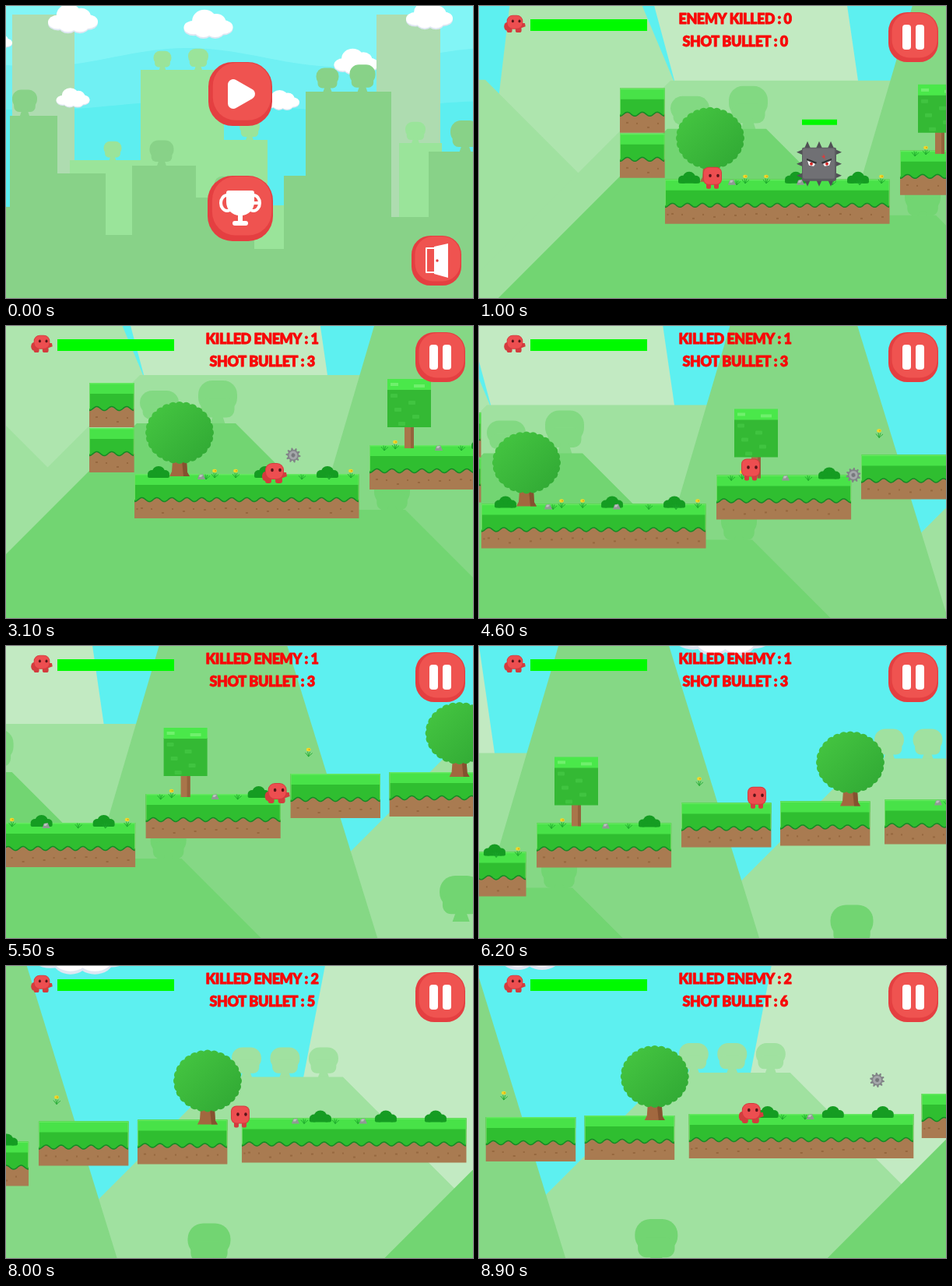
These frames come from a looping animation (600x375 px, 9000 ms). An HTML page with a canvas:

```html
<!DOCTYPE html>
<html>
<head>
<meta charset="utf-8">
<style>
html, body { margin: 0; width: 100%; height: 100%; overflow: hidden }
canvas { display: block; width: 600px; height: 375px }
</style>
</head>
<body>
<canvas id="stage" width="600" height="375"></canvas>
<script>
const c = document.getElementById('stage').getContext('2d');
const LOOP = 9000, MENU_END = 600, BLOCK = 57.7;

// Walk: [time, x]; jumps: [start, duration, height, rise to the next ledge]
const walk = [[1300,61],[2000,83],[2400,90],[3100,180],[3900,248],[4600,346],[5500,471],[6200,585],
  [7400,747],[8350,747],[8900,829]];
const jumps = [[250,700,50,0],[3900,750,30,37],[5500,730,36,26],[6650,850,50,4]];
// [time, target x, target y, flight, arc, rest]
const shots = [[2000,172,-20,350,10,0],[2400,172,-20,300,10,0],[3100,478,-37,1100,45,700],
  [7200,880,-95,650,52,0],[7300,880,-95,650,30,0],[8200,1085,-95,1000,20,0]];
const enemies = [[198,-20,2700],[902,-90,7950],[1114,-113,LOOP]];
const ledges = [[-58,-117,1],[-58,-59,1],[0,0,5],[302,-37,3],[488,-63,2],[615,-65,2],[749,-67,5],[1048,-93,5]];

const clamp = u => Math.min(1, Math.max(0, u));
const mix = (a, b, u) => a + (b - a) * u;
const hop = u => 4 * u * (1 - u);

function heroAt(t) {
  let x = walk[0][1], y = 12;
  walk.slice(1).forEach(([end, to], i) => {
    const [begin, from] = walk[i];
    x += (to - from) * clamp((t - begin) / (end - begin));
  });
  for (const [begin, span, height, rise] of jumps) {
    const u = clamp((t - begin) / span);
    y -= rise * u + height * hop(u);
  }
  return [x, y];
}
// The camera trails the hero: mean position over the last 0.7 s.
function cameraAt(t) {
  let x = 0, y = 0;
  const n = 28;
  for (let i = 0; i < n; i++) {
    const [hx, hy] = heroAt(t - (i + .5) * 700 / n);
    x += hx / n;
    y += hy / n;
  }
  return [300 - x, 202 - y];
}

function rect(color, x, y, w, h, r = 0) {
  c.fillStyle = color;
  c.beginPath();
  c.roundRect(x, y, w, h, r);
  c.fill();
}
function oval(color, x, y, rx, ry = rx) {
  c.fillStyle = color;
  c.beginPath();
  c.ellipse(x, y, rx, ry, 0, 0, 7);
  c.fill();
}
function poly(color, ...p) {
  c.fillStyle = color;
  c.beginPath();
  for (let i = 0; i < p.length; i += 2) c.lineTo(p[i], p[i + 1]);
  c.closePath();
  c.fill();
}
function at(x, y, draw, s = 1) {
  c.save();
  c.translate(x, y);
  c.scale(s, s);
  draw();
  c.restore();
}

// Flat tree standing on (x, y)
function shadowTree(color, x, y, w, h) {
  rect(color, x - w / 2, y - h, w, h * .72, w * .36);
  rect(color, x - w * .43, y - h * .6, w * .86, h * .45, w * .2);
  poly(color, x - w * .1, y - h * .25, x + w * .1, y - h * .25, x + w * .2, y + 1, x - w * .2, y + 1);
}
function cloud(x, y, w) {
  at(x, y, () => {
    for (const [color, dy] of [['#dfe6f2', 3], ['#fff', 0]]) {
      oval(color, -30, 4 + dy, 20, 14);
      oval(color, 30, 3 + dy, 20, 14);
      oval(color, -8, -10 + dy, 25, 22);
      oval(color, 16, -6 + dy, 20, 18);
      oval(color, -10, 10 + dy, 18, 14);
      oval(color, 14, 11 + dy, 18, 13);
    }
  }, w / 100);
}
function button(x, y, s) {
  rect('#e43f41', x, y, s, s, s * .38);
  rect('#ef5350', x + s * .07, y + 1, s * .91, s * .9, s * .36);
}

// Steps are [left, top]; trees are [x, width].
function skyline(color, steps, trees) {
  steps.forEach(([x, y], i) => rect(color, x, y, (steps[i + 1] || [600])[0] - x, 375 - y));
  for (const [x, w] of trees) shadowTree(color, x, steps.findLast(s => s[0] <= x)[1], w, w * 1.05);
}

function menu() {
  const far = '#aedcb0';
  rect('#82f5f6', 0, 0, 600, 375);
  for (const [color, y, amp] of [['#70f0f3', 66, 12], ['#5deef0', 128, 6]]) {
    c.fillStyle = color;
    c.beginPath();
    c.moveTo(0, 375);
    for (let x = 0; x <= 600; x += 10) c.lineTo(x, y - amp * Math.sin(x / 62 - 2.2));
    c.lineTo(600, 375);
    c.fill();
  }
  cloud(-10, 46, 36);
  cloud(450, 73, 57);
  rect(far, 8, 11, 80, 300);
  rect(far, 476, 11, 82, 300);
  for (const [x, y, w] of [[86,18,64],[260,25,63],[544,14,60],[86,119,43],[355,122,44]]) cloud(x, y, w);
  skyline('#9ae49a', [[82,198],[173,82],[280,172],[336,256],[380,375],[505,176],[560,375]],
    [[137,23],[201,23],[247,26],[313,26],[526,26]]);
  skyline('#88d288', [[0,258],[5,141],[66,215],[128,294],[162,205],[244,246],[319,312],[357,218],[385,110],
    [495,271],[543,187]], [[24,32],[200,31],[281,26],[413,29],[458,33],[590,38]]);

  button(260, 72, 82);
  c.lineJoin = 'round';
  c.lineWidth = 14;
  c.strokeStyle = '#fff';
  poly('#fff', 292, 101, 292, 125, 313, 113);
  c.stroke();

  button(259, 218, 84);
  c.lineWidth = 4;
  c.beginPath();
  c.ellipse(284, 253, 8, 10, 0, 0, 7);
  c.ellipse(318, 253, 8, 10, 0, 0, 7);
  c.stroke();
  rect('#fff', 283, 237, 36, 32, [3, 3, 17, 17]);
  rect('#fff', 298, 266, 6, 13);
  rect('#fff', 291, 276, 20, 6, 3);

  button(521, 295, 64);
  c.lineWidth = 2;
  c.strokeRect(540, 311, 24, 31);
  poly('#fff', 550, 309, 568, 305, 568, 349, 550, 344);
  oval('#e43f41', 554, 327, 1.7);
}

// Flat-topped hill; a and b are how far each side spreads per pixel down.
function hill(color, x1, x2, top, a, b) {
  const h = 260 - top;
  poly(color, x1, top, x2, top, x2 + b * h, 260, x1 - a * h, 260);
}
function backdrop() {
  const pale = '#c2eac2', light = '#a0e1a0', medium = '#85d885', deep = '#72d572', shade = '#82d982';
  hill(pale, -40, 220, -320, -.27, .145);
  hill('#aee5ae', -188, -70, -320, .12, .42);
  hill(light, -400, -231, -128, 0, 1);
  hill(light, 7, 320, -127, 1, 0);
  cloud(542, -287, 130);
  hill(pale, 869, 1300, -330, .194, 0);
  for (let i = 0; i < 3; i++) shadowTree(light, 755 + 49.5 * i, -119, 38, 39);
  hill(light, 722, 879, -120, 1, 1);
  shadowTree(deep, 707, 126, 55, 58);
  hill(medium, 334, 468, -278, .295, .309);
  shadowTree(shade, 32, -64, 50, 43);
  shadowTree(shade, 107, -64, 50, 56);
  shadowTree(deep, 331, 54, 46, 50);
  hill(deep, 3, 130, -65, 1, 1);
  hill(deep, 100, 348, 46, 0, 1);
  hill(deep, -400, 300, 153, 0, 0);
  hill(deep, 1145, 1400, -100, 1, 0);
}

function platform(x, y, blocks) {
  const w = blocks * BLOCK;
  const wave = () => {
    for (let i = 0; i <= w; i++) c.lineTo(i, 33 + 2.5 * Math.cos(i * 6 * Math.PI / BLOCK));
  };
  at(x, y, () => {
    rect('#a97b51', 0, 0, w, 57);
    c.fillStyle = '#96683f';
    for (let i = 8; i < w - 4; i += 27) {
      c.fillRect(i, 43 + i % 4 * 2, 3, 2);
      c.fillRect((i + 13) % w, 50 - i % 3 * 3, 2, 2);
    }
    c.fillStyle = '#2fbe30';
    c.beginPath();
    c.lineTo(0, 0);
    wave();
    c.lineTo(w, 0);
    c.fill();
    c.lineWidth = 1.5;
    c.strokeStyle = '#148a25';
    c.beginPath();
    wave();
    c.stroke();
    rect('#48e248', 0, 0, w, 14);
    rect('#64ea60', 0, 0, w, 1.5);
    rect('#6ddd64', 0, 0, 1, 33);
    rect('#6ddd64', w - 1, 0, 1, 33);
  });
}

function roundTree(x, y) {
  at(x, y, () => {
    poly('#a2683f', -9, -20, 9, -20, 10, -5, 13, 0, -13, 0, -10, -6);
    poly('#85512f', 3, -20, 9, -20, 10, -5, 13, 0, 5, 0);
    const leaf = c.createLinearGradient(-30, -85, 30, -25);
    leaf.addColorStop(0, '#43c340');
    leaf.addColorStop(1, '#32ab35');
    for (let i = 0; i < 28; i++) {
      const a = i * Math.PI / 14;
      oval(leaf, 38 * Math.cos(a), -56 + 34 * Math.sin(a), 6);
    }
    oval(leaf, 0, -56, 42, 38);
  });
}
function squareTree(x, y) {
  at(x, y, () => {
    rect('#a9754a', -6, -28, 12, 28);
    rect('#94633c', 2, -28, 4, 28);
    rect('#34b934', -28, -76, 56, 49);
    rect('#4ae84a', -28, -89, 56, 14);
    for (let i = 0; i < 5; i++) rect('#40c440', -24 + i * 23 % 41, -70 + i * 9, 9, 5, 1);
    rect('#6ff06c', -24, -84, 10, 4);
    rect('#6ff06c', 6, -82, 14, 4);
  });
}
function bush(x, y) {
  const green = '#159c22';
  oval(green, x, y - 8, 8, 7);
  oval(green, x - 8, y - 5, 6, 5);
  oval(green, x + 8, y - 5, 6, 5);
  rect(green, x - 14, y - 5, 28, 5, 2);
}
function grass(x, y) {
  c.strokeStyle = '#1ba52b';
  c.lineWidth = .8;
  c.beginPath();
  for (const d of [-4, -1, 2, 5]) {
    c.moveTo(x, y + 4);
    c.lineTo(x + d, y - 3 + Math.abs(d) / 2);
  }
  c.stroke();
}
function flower(x, y) {
  grass(x, y + 4);
  oval('#f0d92b', x, y - 1, 2.8, 2.2);
  oval('#dba812', x + 1, y - 1, 1);
}
function rock(x, y) {
  poly('#8f9a94', x - 5, y + 3, x - 3, y - 3, x + 2, y - 4, x + 5, y + 3);
  poly('#b9c2bd', x - 3, y, x - 2, y - 3, x + 2, y - 3, x, y);
}
function plant(draw, dy, ...xs) {
  for (const x of xs) draw(x, ledges.findLast(l => l[0] <= x)[1] + dy);
}

function enemy(x, y) {
  rect('#00f800', x - 22, y - 57, 45, 7);
  at(x, y, () => {
    for (let side = 0; side < 4; side++) {
      for (const p of [-15, 0, 15]) poly('#505155', p - 4, -20, p, -29, p + 4, -20);
      c.rotate(Math.PI / 2);
    }
    rect('#5c5d61', -22, -21, 44, 43, 2);
    rect('#707074', -21, -20, 41, 39, 2);
    for (const s of [-1, 1]) {
      poly('#fff', s * 5, 0, s * 15, -4, s * 13, 2, s * 7, 3);
      oval('#d42525', s * 10, 0, 2);
      poly('#333', s * 3, -2, s * 16, -7, s * 16, -5, s * 4, 0);
    }
    poly('#e33', 5, -13, 8, -9, 6, -9, 9, -5, 3, -10, 6, -10);
  });
}
function gear(x, y, angle) {
  at(x, y, () => {
    c.rotate(angle);
    const teeth = [];
    for (let i = 0; i < 40; i++) {
      const r = i % 4 < 2 ? 9.5 : 7, a = i * Math.PI / 20;
      teeth.push(r * Math.cos(a), r * Math.sin(a));
    }
    poly('#818487', ...teeth);
    oval('#a4a7aa', 0, 0, 5.5);
    oval('#777a7d', 0, 0, 2.5);
  });
}
function bullet(t, [fired, tx, ty, flight, arc, rest]) {
  if (t < fired || t > fired + flight + rest) return;
  const u = clamp((t - fired) / flight), [x, y] = heroAt(fired);
  const bx = mix(x + 24, tx, u);
  gear(bx, mix(y - 36, ty, u) - arc * hop(u), bx / 9);
}

// Feet stand on (x, y)
function blob(x, y, run, s = 1) {
  const edge = '#d33c3e', red = '#ed4e50';
  at(x, y, () => {
    if (run) {
      rect(edge, -12, -8, 8, 8, 3);
      rect(edge, 1, -8, 9, 8, 3);
      oval(edge, -12, -9, 4, 6);
      poly(edge, 6, -14, 15, -14, 16, -9, 8, -6);
      rect(edge, -12, -26, 24, 21, 9);
      rect(red, -11, -25, 22, 19, 8);
    } else {
      rect(edge, -8, -8, 6, 8, 2);
      rect(edge, 2, -8, 6, 8, 2);
      rect(edge, -12, -28, 24, 23, 7);
      rect(red, -11, -27, 22, 21, 6);
    }
    oval('#5a1418', -3, -17, 1.8, 2.2);
    oval('#5a1418', 7, -17, 1.8, 2.2);
  }, s);
}

function game(t) {
  const [hx, hy] = heroAt(t);
  rect('#5df0f0', 0, 0, 600, 375);
  at(...cameraAt(t), () => {
    backdrop();
    for (const l of ledges) platform(...l);
    plant(bush, 5, 31, 168, 248, 447, 850, 934, 998);
    roundTree(58, 3);
    roundTree(705, -59);
    squareTree(353, -33);
    plant(grass, 3, 92, 215, 250, 321, 420, 829, 869, 898);
    plant(flower, -3, 103, 130, 278, 335, 1086);
    flower(511, -93);
    plant(rock, 4, 86, 174, 391, 818, 905);
    for (const [x, y, end] of enemies) if (t < end) enemy(x, y);
    for (const s of shots) bullet(t, s);
    const airborne = jumps.some(([begin, span]) => t > begin && t < begin + span);
    const moving = heroAt(t - 50)[0] !== hx;
    blob(hx, hy, moving && !airborne && t / 100 % 2 === 1);
  });
  hud(t);
}

function hud(t) {
  blob(46, 34, true, .86);
  rect('#00fa00', 66, 17, 150, 15);
  const killed = enemies.filter(e => t >= e[2]).length;
  const fired = shots.filter(s => t >= s[0]).length;
  c.font = '900 18px Lato, sans-serif';
  c.letterSpacing = '-0.5px';
  c.textAlign = 'center';
  c.fillStyle = c.strokeStyle = '#f80808';
  c.lineWidth = .8;
  const label = (s, y) => { c.fillText(s, 329, y); c.strokeText(s, 329, y); };
  label((killed ? 'KILLED ENEMY : ' : 'ENEMY KILLED : ') + killed, 22.5);
  label('SHOT BULLET : ' + fired, 51.5);
  button(526, 8, 64);
  rect('#fff', 544, 24, 11, 32, 4);
  rect('#fff', 561, 24, 11, 32, 4);
}

const start = performance.now();
function frame() {
  const t = Math.floor((performance.now() - start) % LOOP / 100) * 100;
  t < MENU_END ? menu() : game(t);
  requestAnimationFrame(frame);
}
frame();
</script>
</body>
</html>
```
